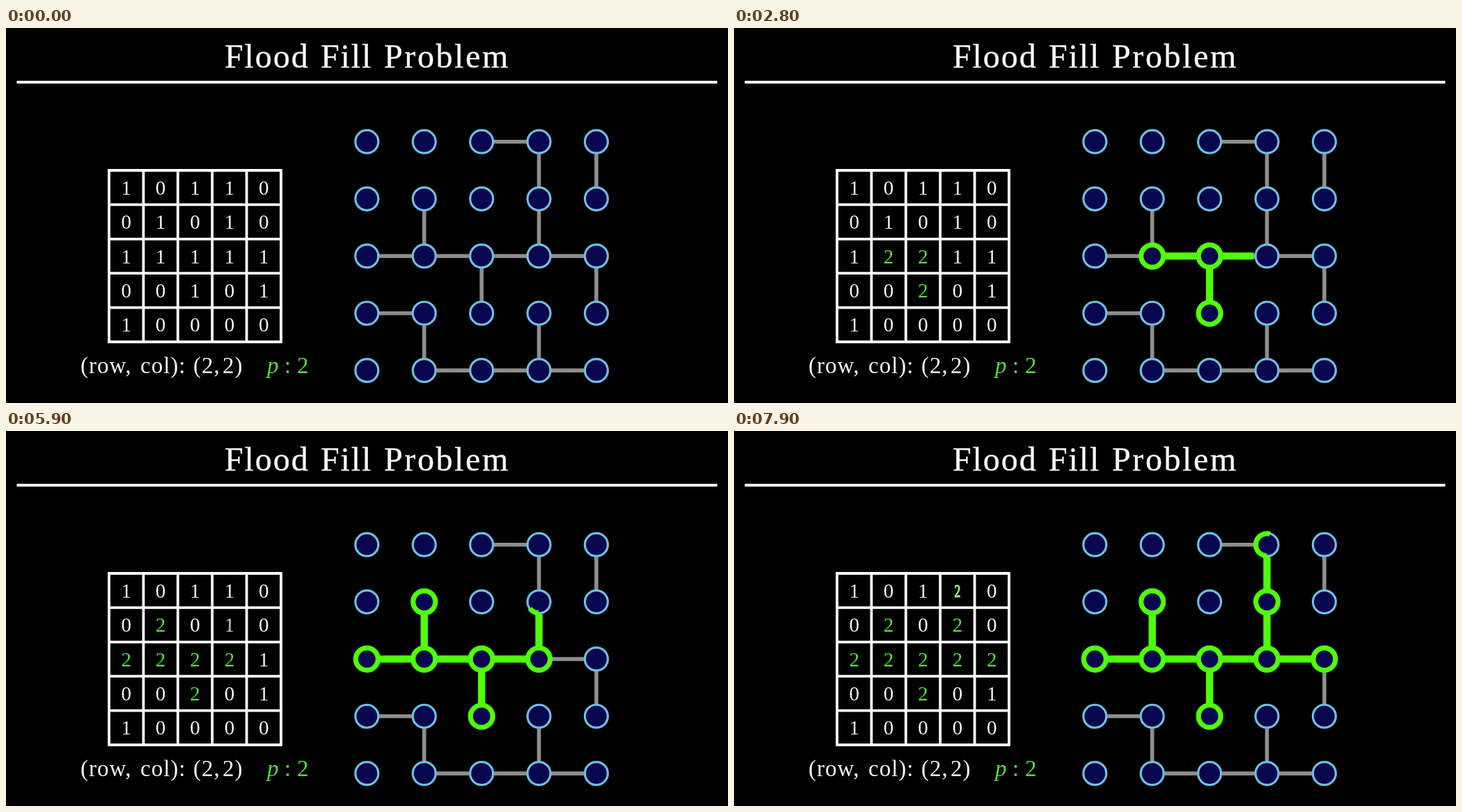
Write an HTML page that moves like this. It is 1037 px wide and 540 px high and loops after 8 s.

```html
<!DOCTYPE html>
<html lang="en">
<head>
<meta charset="utf-8">
<title>Flood Fill Problem</title>
<style>
  html, body { margin: 0; width: 100%; height: 100%; overflow: hidden; background: #000; }
  svg { display: block; width: 1037px; height: 540px; }
  text { font-family: "Liberation Serif", "Times New Roman", serif; fill: #f6f6f6; white-space: pre; }
  .title { font-size: 48px; letter-spacing: 1.9px; stroke: #f6f6f6; stroke-width: 0.4; }
  .label { font-size: 33px; letter-spacing: 1px; }
  .label .green { fill: #55dc3c; }
  .digit { font-size: 29px; text-anchor: middle; }
  .rule { stroke: #fff; stroke-width: 3.8; fill: none; }
  .edge { stroke: #8e8e8e; stroke-width: 5.6; }
  .node { fill: #07064f; stroke: #6fc1de; stroke-width: 3.2; }
  .lit { stroke: #4fff08; fill: none; }
  line.lit { stroke-width: 10.4; }
  circle.lit { stroke-width: 7.2; }
</style>
</head>
<body>
<svg id="stage" viewBox="0 0 1037 540">
  <text class="title" y="57"><tspan x="314">Flood</tspan><tspan x="452">Fill</tspan><tspan x="543" letter-spacing="2.6">Problem</tspan></text>
  <path class="rule" d="M15.5 78H1021.5"/>
  <text class="label" y="497"><tspan x="107">(row,</tspan><tspan x="193">col):</tspan><tspan x="269">(2,</tspan><tspan x="311">2)</tspan><tspan class="green" x="375" font-style="italic">p</tspan><tspan class="green" x="400">:</tspan><tspan class="green" x="418">2</tspan></text>
</svg>
<script>
const LOOP = 8000, STEP = 100;
const CYCLE = 951.5, FIRST_RING = 19, RING_TIME = 520, EDGE_TIME = CYCLE - RING_TIME;
const NODE_R = 16.5, GAP = 17.5;
const CELL = 49.4, LEFT = 148, TOP = 205;
const WHITE = [246, 246, 246], GREEN = [85, 224, 60];

const matrix = ["10110", "01010", "11111", "00101", "10000"];
// Edge starts, written as row and column.
const across = ["02", "20", "21", "22", "23", "30", "41", "42", "43"];
const down = ["03", "04", "11", "13", "22", "24", "31", "33"];
// Visits in breadth-first order: cell, then the cell it was reached from.
const visits = ["22", "21 22", "32 22", "23 22", "20 21", "11 21", "13 23", "24 23", "03 13"];

const stage = document.getElementById("stage");

function add(tag, attrs, parent = stage) {
  const el = document.createElementNS("http://www.w3.org/2000/svg", tag);
  for (const name in attrs) el.setAttribute(name, attrs[name]);
  parent.append(el);
  return el;
}

const nodeAt = ([r, c]) => ({ x: 518.3 + 82.4 * c, y: 163.7 + 82.35 * r });

function segment(from, to, cls) {
  const a = nodeAt(from), b = nodeAt(to);
  const dx = Math.sign(Math.round(b.x - a.x)), dy = Math.sign(Math.round(b.y - a.y));
  return add("line", {
    class: cls,
    x1: a.x + dx * GAP, y1: a.y + dy * GAP,
    x2: b.x - dx * GAP, y2: b.y - dy * GAP
  });
}

function digitAt([r, c], value) {
  const g = add("g", {
    transform: `translate(${LEFT + CELL * (+c + 0.5)} ${TOP + CELL * (+r + 0.5)})`
  });
  const el = add("text", { class: "digit", y: 10 }, g);
  el.textContent = value;
  return el;
}

let gridPath = "";
for (let i = 0; i < 6; i++) {
  const x = LEFT + CELL * i, y = TOP + CELL * i;
  gridPath += `M${LEFT - 1.9} ${y}h${CELL * 5 + 3.8}M${x} ${TOP}v${CELL * 5}`;
}
add("path", { class: "rule", d: gridPath });

const digits = {};
for (const cell of across) segment(cell, [+cell[0], +cell[1] + 1], "edge");
for (const cell of down) segment(cell, [+cell[0] + 1, +cell[1]], "edge");
matrix.forEach((row, r) => [...row].forEach((value, c) => {
  const cell = `${r}${c}`, { x, y } = nodeAt(cell);
  add("circle", { class: "node", cx: x, cy: y, r: NODE_R });
  digits[cell] = digitAt(cell, value);
}));

const steps = visits.map((visit, i) => {
  const [cell, parent] = visit.split(" ");
  const { x, y } = nodeAt(cell);
  let angle = 180;
  if (parent) {
    const p = nodeAt(parent);
    angle = Math.atan2(p.y - y, p.x - x) * 180 / Math.PI;
  }
  return {
    start: FIRST_RING + CYCLE * i,
    edge: parent && segment(parent, cell, "lit"),
    ring: add("circle", {
      class: "lit", r: 16, transform: `translate(${x} ${y}) rotate(${angle})`
    }),
    before: digits[cell],
    after: digitAt(cell, 2)
  };
});

const clamp = v => Math.min(1, Math.max(0, v));
const sigmoid = v => 1 / (1 + Math.exp(-v));

function smooth(v) {
  const low = sigmoid(-5);
  return clamp((sigmoid(10 * (clamp(v) - 0.5)) - low) / (1 - 2 * low));
}

function trace(el, p) {
  const length = el.getTotalLength();
  el.style.visibility = p > 0 ? "visible" : "hidden";
  el.style.strokeDasharray = p < 1 ? `${length * p} ${length * 2}` : "none";
}

// The new digit grows out of the narrow old one, thickened on the way.
function morph(before, after, p) {
  const color = `rgb(${WHITE.map((w, i) => Math.round(w + (GREEN[i] - w) * p))})`;
  const bulge = Math.sin(Math.PI * p);
  before.style.fill = after.style.fill = after.style.stroke = color;
  before.style.opacity = clamp(1 - 1.5 * p);
  after.style.opacity = clamp(2 * p);
  after.style.strokeWidth = 1.4 * bulge;
  after.style.transform = `scale(${0.45 + 0.55 * p * p}, ${1 - 0.1 * bulge})`;
}

function render(time) {
  for (const { start, edge, ring, before, after } of steps) {
    const p = smooth((time - start) / RING_TIME);
    if (edge) trace(edge, smooth((time - start + EDGE_TIME) / EDGE_TIME));
    trace(ring, p);
    morph(before, after, p);
  }
}

let origin;
function tick(now) {
  origin ??= now;
  // The motion advances in tenths of a second.
  render(Math.floor(((now - origin + 10) % LOOP) / STEP) * STEP);
  requestAnimationFrame(tick);
}
render(0);
requestAnimationFrame(tick);
</script>
</body>
</html>
```
